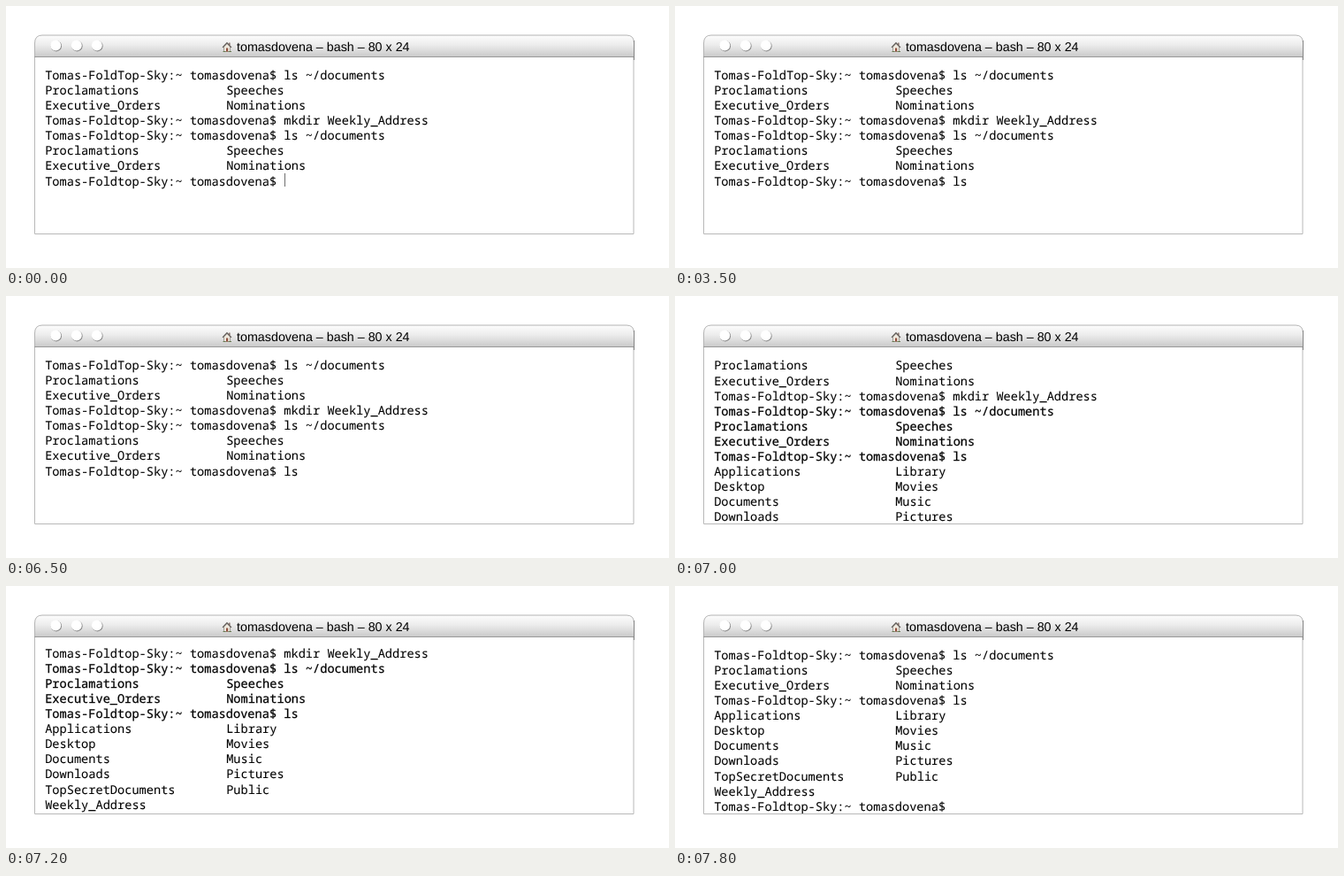
Write an HTML page that moves like this. It is 750 px wide and 296 px high and loops after 8000 ms.

```html
<!DOCTYPE html>
<html lang="en">
<head>
<meta charset="utf-8">
<title>Terminal</title>
<style>
  html, body { margin: 0; width: 100%; height: 100%; overflow: hidden; background: #fff; }
  svg { display: block; width: 750px; height: 296px; }
  text { text-rendering: geometricPrecision; }
  .title { font: 14.3px "Liberation Sans", Arial, sans-serif; fill: #000; }
  .lines { font: 13.65px "Noto Sans Mono", "DejaVu Sans Mono", monospace; fill: #000; stroke: #000; stroke-width: .08px; }

  .scroll, .twice, .key-l, .key-s, .list, .last, .caret { animation: 8s step-end infinite; }
  .scroll { animation-name: scroll; }
  .twice { animation-name: twice; }
  .key-l { animation-name: key-l; }
  .key-s { animation-name: key-s; }
  .list { animation-name: list; }
  .last { animation-name: last; }
  .caret { fill: #6e6e6e; }
  .wait { animation-name: wait; }
  .typed { animation-name: typed; }

  @keyframes scroll {
    0% { transform: translateY(0); }
    87.5% { transform: translateY(-16.4px); }
    88.75% { transform: translateY(-34.8px); }
    90% { transform: translateY(-53.4px); }
    91.25%, 100% { transform: translateY(-68.4px); }
  }
  @keyframes twice {
    0%, 91.25%, 100% { stroke-width: .08px; }
    87.5% { stroke-width: .27px; }
  }
  @keyframes key-l { 0% { visibility: hidden; } 37.5%, 100% { visibility: visible; } }
  @keyframes key-s { 0% { visibility: hidden; } 43.75%, 100% { visibility: visible; } }
  @keyframes list { 0% { visibility: hidden; } 87.5%, 100% { visibility: visible; } }
  @keyframes last { 0% { visibility: hidden; } 97.5%, 100% { visibility: visible; } }
  @keyframes wait {
    0%, 12.5%, 25% { visibility: visible; }
    6.25%, 18.75%, 31.25%, 100% { visibility: hidden; }
  }
  @keyframes typed {
    0%, 56.25%, 68.75%, 81.25%, 100% { visibility: hidden; }
    50%, 62.5%, 75% { visibility: visible; }
  }
</style>
</head>
<body>
<svg viewBox="0 0 750 296" xmlns="http://www.w3.org/2000/svg">
  <defs>
    <linearGradient id="bar" x2="0" y2="1">
      <stop offset="0" stop-color="#fdfdfd"/>
      <stop offset=".45" stop-color="#ececec"/>
      <stop offset="1" stop-color="#c9c9c9"/>
    </linearGradient>
    <filter id="soft" x="-50%" y="-50%" width="200%" height="200%">
      <feGaussianBlur stdDeviation=".7"/>
    </filter>
    <g id="button">
      <circle cx=".6" cy=".7" r="6.2" fill="#858585" filter="url(#soft)"/>
      <circle r="6" fill="#fff"/>
    </g>
    <clipPath id="pane"><path d="M33 70H709V257H33Z"/></clipPath>
  </defs>

  <!-- window -->
  <path d="M32.5 57V257.5H710V57" fill="#fff" stroke="#b8b8b8"/>
  <path d="M32.5 57.5V42Q32.5 33 41 33H702Q710.5 33 710.5 42V57.5Z" fill="url(#bar)" stroke="#b4b4b4"/>
  <path d="M32 57.5H710.5" stroke="#999"/>
  <path d="M710.5 39V61" stroke="#858585"/>
  <use href="#button" x="56.2" y="44.5"/>
  <use href="#button" x="79.8" y="44.5"/>
  <use href="#button" x="102.8" y="44.5"/>

  <!-- house -->
  <path d="M246.5 46L250 42.5L253.5 46V51.5H246.5Z" fill="#eee9df" stroke="#85817a" stroke-width=".7"/>
  <path d="M245 46.8L250 41.7L255 46.8" fill="none" stroke="#5c5854" stroke-width="1.2"/>
  <path d="M252.2 41.5H253.5V44H252.2Z" fill="#775b52"/>
  <path d="M249 47.5H251.2V51.5H249Z" fill="#92513f"/>
  <path d="M245.5 51.5H248.5M251.7 51.5H255" stroke="#66784f"/>

  <text class="title" x="261" y="51">tomasdovena – bash – 80 x 24</text>

  <g clip-path="url(#pane)">
    <g class="scroll">
      <text class="lines" y="82.8">
        <tspan x="44.2">Tomas-FoldTop-Sky:~ tomasdovena$ ls ~/documents</tspan>
        <tspan x="44.2" dy="17.1">Proclamations</tspan><tspan x="249.2">Speeches</tspan>
        <tspan x="44.2" dy="17.1">Executive_Orders</tspan><tspan x="249.2">Nominations</tspan>
        <tspan x="44.2" dy="17.1">Tomas-Foldtop-Sky:~ tomasdovena$ mkdir Weekly_Address</tspan>
      </text>
      <text class="lines twice" y="151.2">
        <tspan x="44.2">Tomas-Foldtop-Sky:~ tomasdovena$ ls ~/documents</tspan>
        <tspan x="44.2" dy="17.1">Proclamations</tspan><tspan x="249.2">Speeches</tspan>
        <tspan x="44.2" dy="17.1">Executive_Orders</tspan><tspan x="249.2">Nominations</tspan>
        <tspan x="44.2" dy="17.1">Tomas-Foldtop-Sky:~ tomasdovena$ <tspan class="key-l">l</tspan><tspan class="key-s">s</tspan></tspan>
      </text>
      <text class="lines list" y="219.6">
        <tspan x="44.2">Applications</tspan><tspan x="249.2">Library</tspan>
        <tspan x="44.2" dy="17.1">Desktop</tspan><tspan x="249.2">Movies</tspan>
        <tspan x="44.2" dy="17.1">Documents</tspan><tspan x="249.2">Music</tspan>
        <tspan x="44.2" dy="17.1">Downloads</tspan><tspan x="249.2">Pictures</tspan>
        <tspan x="44.2" dy="17.1">TopSecretDocuments</tspan><tspan x="249.2">Public</tspan>
        <tspan x="44.2" dy="17.1">Weekly_Address</tspan>
      </text>
      <text class="lines last" x="44.2" y="322.2">Tomas-Foldtop-Sky:~ tomasdovena$</text>
    </g>
  </g>

  <rect class="caret wait" x="315" y="189" width="1" height="15"/>
  <rect class="caret typed" x="344.4" y="189" width="1" height="15"/>
</svg>
</body>
</html>
```
